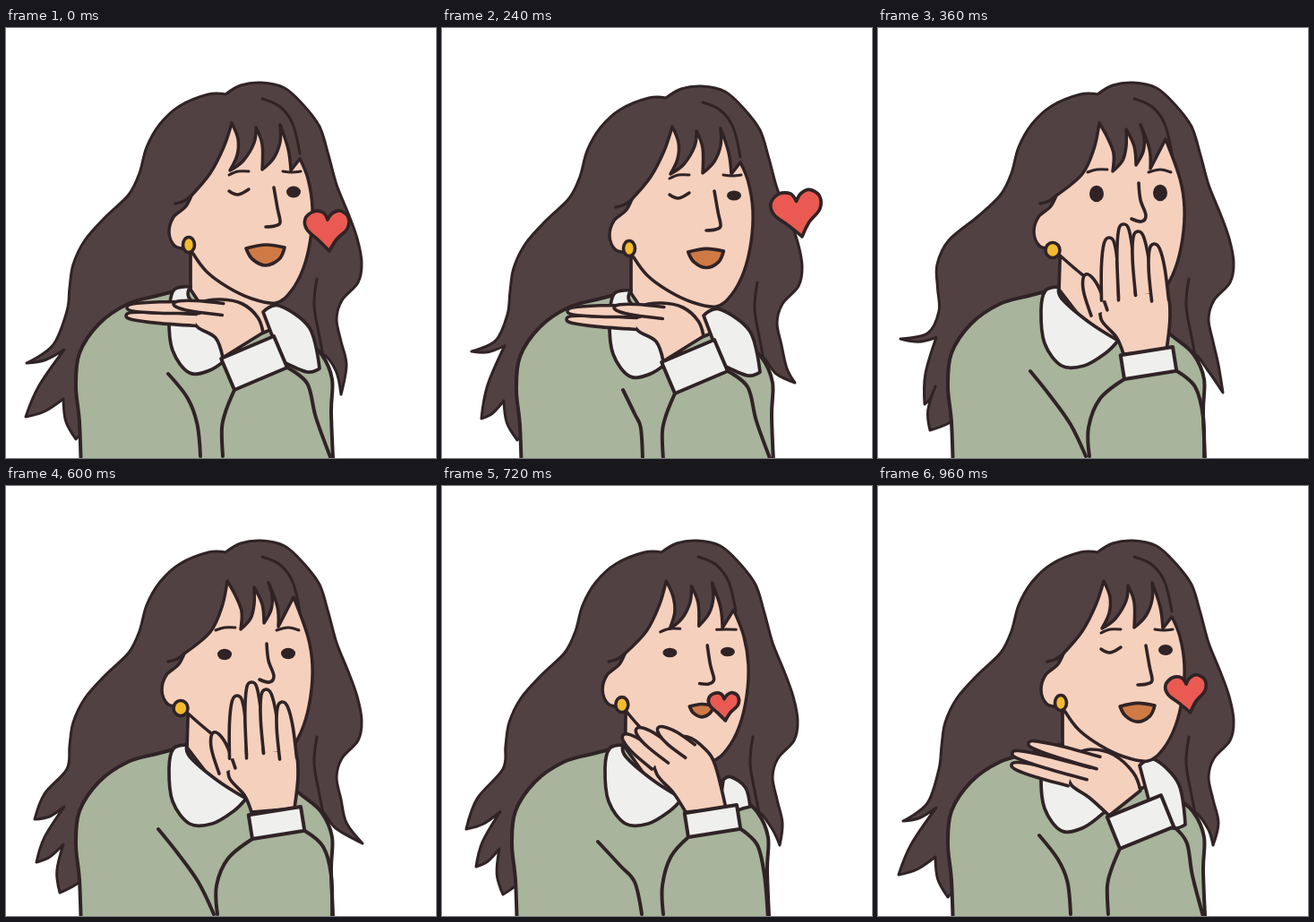
These frames come from a looping animation (480 px wide and 480 px high, 1080 ms). An HTML page:

```html
<!DOCTYPE html>
<html lang="en">
<head>
<meta charset="utf-8">
<title>Blowing a kiss</title>
<style>
html, body { margin: 0; width: 100%; height: 100%; overflow: hidden; background: #fff; }
svg { display: block; width: 100vw; height: 100vh; }
</style>
</head>
<body>
<svg id="stage" viewBox="0 0 480 480" stroke-linejoin="round" stroke-linecap="round"></svg>
<script>
const INK = '#302326', SKIN = '#f5d0bd', GREEN = '#a8b49c', WHITE = '#efefee', HAIR = '#514143';
const STEP = 120, LOOP = 1080;

// Points are written "x,y"; a trailing ! marks a sharp corner
const parse = s => s.trim().split(/\s+/).map(w => {
  const [x, y] = w.replace('!', '').split(',').map(Number);
  return { x, y, sharp: w.endsWith('!') };
});
const move = (p, x, y, sharp = false) => ({ x: p.x + x, y: p.y + y, sharp });

// Blends numbers, points, lists and whole poses
function mix(a, b, t) {
  if (typeof a === 'number') return a + (b - a) * t;
  if (Array.isArray(a)) return a.map((v, i) => mix(v, b[i], t));
  if (a && typeof a === 'object') {
    return Object.fromEntries(Object.keys(a).map(k => [k, mix(a[k], b[k], t)]));
  }
  return a;
}

// Smooth curve through the points, with straight handles at corners
function curve(pts, closed) {
  const n = pts.length, at = i => pts[(i + n) % n];
  const handle = i => {
    const end = !closed && (i === 0 || i === n - 1);
    if (at(i).sharp || end) return [0, 0];
    return [(at(i + 1).x - at(i - 1).x) / 6, (at(i + 1).y - at(i - 1).y) / 6];
  };
  let d = `M${pts[0].x} ${pts[0].y}`;
  for (let i = 0; i < (closed ? n : n - 1); i++) {
    const p = at(i), q = at(i + 1), h = handle(i), g = handle((i + 1) % n);
    d += `C${p.x + h[0]} ${p.y + h[1]} ${q.x - g[0]} ${q.y - g[1]} ${q.x} ${q.y}`;
  }
  return d + (closed ? 'Z' : '');
}

const path = (d, fill, width) =>
  `<path d="${d}" fill="${fill}" stroke="${width ? INK : 'none'}" stroke-width="${width}"/>`;
const points = p => typeof p === 'string' ? parse(p) : p;
const shape = (p, fill, width = 3.7) => path(curve(points(p), true), fill, width);
const line = (p, width = 3.6) => path(curve(points(p), false), 'none', width);
const oval = (x, y, rx, ry, fill, width = 0) =>
  `<ellipse cx="${x}" cy="${y}" rx="${rx}" ry="${ry}" fill="${fill}" stroke="${INK}" stroke-width="${width}"/>`;

// Each gesture: palm outline and fingers as [base x, base y, tip x, tip y]
const offer = {
  palm: parse('287,340! 281,323 264,308 240,303 216,307 206,319 214,334 234,346 242,368!'),
  fingers: [[212, 326, 134, 321], [216, 312, 135, 312], [242, 314, 187, 308]], thick: 6.5
};
const cup = {
  palm: parse('322,360! 326,322 322,298 300,295 270,297 252,304 249,325 266,345 274,364!'),
  fingers: [[247, 318, 232, 275], [259, 304, 258, 234], [278, 299, 274, 219],
    [297, 297, 290, 227], [315, 304, 308, 241]], thick: 9.5
};
const curl = {
  palm: parse('317,360! 305,312 294,294 274,280 256,285 237,300 240,322 258,342 272,364!'),
  fingers: [[240, 309, 202, 278], [258, 302, 217, 271], [277, 296, 241, 270]], thick: 9
};
const fan = {
  palm: parse('293,340! 285,320 263,300 238,294 222,300 212,318 216,334 236,348 258,368!'),
  fingers: [[214, 328, 149, 311], [235, 321, 150, 298], [246, 309, 168, 287]], thick: 7
};

// turn: 0 faces forward, 1 looks aside. tips: ends of the loose locks.
// heart: x, y, size, angle. cuff: x, y, angle, width, height. arm, fold: where the creases run.
const send = {
  turn: 1, shift: [0, 0], nod: -2, open: 6.5, wink: 1, smile: 1, puff: 0, flick: 9,
  tips: parse('23,374 22,434 78,459 374,409'), heart: [359, 226, 1, 0],
  cuff: [277, 374, -23, 64, 38], arm: [242, 346], fold: [181, 386, 217],
  collar: parse('287,317! 350,380!'), drop: 8, hand: offer
};
const follow = {
  ...send, shift: [5, 4], open: 5.5, smile: .92, fold: [197, 400, 219],
  tips: parse('28,357 39,432 79,456 389,392'), heart: [392, 203, 1.14, -6]
};
const cover = {
  turn: 0, shift: [0, 0], nod: -1, open: 9.2, wink: 0, smile: 0, puff: -9, flick: 11,
  tips: parse('25,347 52,420 58,449 385,407'), heart: [315, 246, 0, 0],
  cuff: [302, 374, -9, 59, 27], arm: [236, 363], fold: [170, 383, 232],
  collar: null, drop: 0, hand: cup
};
const drowsy = {
  ...cover, nod: 2, open: 6.2, puff: 0, flick: -5, cuff: [302, 376, -9, 59, 27],
  tips: parse('32,372 34,420 60,454 398,399')
};
const kiss = {
  ...cover, turn: .65, nod: 0, open: 5.3, smile: .62, puff: 0, flick: -6,
  tips: parse('27,383 38,425 68,456 377,401'), heart: [315, 246, .69, 0],
  arm: [247, 360], fold: [174, 397, 223], collar: parse('314,328! 344,358!'), hand: curl
};
const release = {
  ...send, open: 6, smile: .9, tips: parse('28,374 23,434 78,459 374,401'),
  heart: [345, 232, .92, -5], cuff: [293, 375, -22, 65, 38], arm: [257, 351],
  fold: [180, 390, 215], collar: parse('292,312! 343,378!'), hand: fan
};
const poses = [
  send, mix(send, follow, .5), follow,
  cover, mix(cover, drowsy, .5), drowsy,
  kiss, mix(kiss, release, .5), release
];

function hair({ tips, flick, puff }) {
  const edge = parse(`245,74! 226,74 194,87 172,107 157,133 149,162 137,186 112,210
    ${88 + puff},237 ${75 + puff},264 ${71 + puff / 2},290 68,316`);
  const roots = [{ x: 65, y: tips[0].y / 2 + 172 }, { x: 64, y: tips[1].y - 20 }, { x: 100, y: 425 }];
  let from = edge[edge.length - 1];
  roots.forEach((root, i) => {
    const tip = tips[i], bend = i ? [-5, 0] : [flick, flick * .7];
    edge.push(move(mix(from, tip, .55), ...bend), move(tip, 0, 0, true),
      move(mix(tip, root, .5), 0, 4), move(root, 0, 0, true));
    from = root;
  });
  edge.push(...parse(`340,390! 352,364 368,382 ${tips[3].x},${tips[3].y}! 380,376 374,350 369,325 375,304
    393,284 397,262 392,235 382,207 369,175 360,142 350,110 332,86 311,67 285,61 262,64`));
  return shape(edge, HAIR, 3) + line('286,79 306,88 320,107 328,140', 3) + line('347,280 344,310 350,345 355,370', 3);
}

function clothes({ turn, collar, drop }) {
  const ear = 8 * (turn - 1);
  let out = shape(`84,500! 82,440 78,400 82,363 104,330 136,308 168,299 204,290! 300,320!
    330,345 352,364 364,392 363,430 366,500!`, GREEN, 4);
  out += shape(`${206 + ear / 3},250! ${206 + ear / 2},292! 235,335! 268,348! 300,335! 302,290!`, SKIN);
  if (collar) {
    const [top, tail] = collar, k = Math.hypot(tail.x - top.x, tail.y - top.y) / 89;
    out += shape([top, move(top, 18 * k, -7 * k), move(mix(top, tail, .6), 14 * k, -20 * k),
      tail, move(tail, -14, 4), { x: 308, y: 372, sharp: true }], WHITE);
  }
  return out + shape(`${202 + drop / 2},289! 187,293 182,${315 + drop} 186,${352 + drop} 205,${377 + drop}
    230,${377 + drop / 2} 254,363 268,349! 235,328 205,302`, WHITE);
}

function head({ turn, nod, open, wink, smile }) {
  const ear = 8 * (turn - 1);
  const aside = (a, b) => mix(parse(a), parse(b), turn);
  const feature = (a, b) => aside(a, b).map(p => move(p, 0, nod));
  const lobe = parse('209,252! 200,247 188,243 182,228 187,211 200,200 207,187!').map(p => move(p, ear, 0, p.sharp));
  const fringe = aside(
    '228,163 241,135 247,106! 256,122 263,140 262,160! 273,148 277,132 277,113! 286,132 288,153! 296,138 297,122 293,108! 303,135 304,157! 321,124!',
    '228,162 243,133 252,106! 259,124 258,142 250,159! 265,148 277,128 279,111! 286,130 286,158! 299,145 306,127 306,108! 315,135 318,159! 328,146!');
  const cheek = parse('337,168 342,200 340,235 332,268 318,294 301,307 274,302 247,289 224,272');
  const eye = mix(244, 260, turn), y = 186 + nod;

  let out = shape([...lobe, ...fringe, ...cheek], SKIN, 3.5);
  out += line([move(lobe[6], -18, 9), move(lobe[6], -8, 6), lobe[6]], 3.5);
  out += line(aside('234,161 244,158 256,158', '249,164 259,160 271,160'), 3);
  out += line(aside('302,161 315,158 327,161', '309,160 319,161 329,160'), 3);
  out += line(feature('291,174 293,193 299,210 294,217 283,214', '299,180 303,203 306,219 300,223 290,224'));
  out += wink >= .5
    ? line(`${eye - 11},${y - 2} ${eye - 1},${y + 2} ${eye + 11},${y - 4}`, 3.4)
    : oval(eye, y, 8, open, INK);
  out += oval(mix(315, 321, turn), y - 1, 8, open, INK);
  const lip = (x, dy) => `${290 + x * smile},${246 + dy * smile}`;
  if (smile) {
    out += shape(`${lip(-22, 0)}! ${lip(0, -4)} ${lip(21, -1)}! ${lip(15, 12)} ${lip(0, 19)} ${lip(-15, 12)}`, '#cf7a45');
  }
  return out + oval(mix(195, 204, turn), mix(248, 242, turn), mix(8, 6.5, turn), 8.5, '#f2bb30', 3.6);
}

function finger([bx, by, tx, ty], thick) {
  const len = Math.hypot(tx - bx, ty - by), ux = (tx - bx) / len, uy = (ty - by) / len;
  const at = (along, side) => ({ x: bx + ux * along - uy * side, y: by + uy * along + ux * side });
  const pts = [at(0, thick), at(len * .55, thick * .95), at(len - 6, thick * .6), at(len, 0),
    at(len - 6, -thick * .6), at(len * .55, -thick * .95), at(0, -thick)];
  return path(curve(pts, false), SKIN, 3.6);
}

function arm({ turn, cuff: [x, y, angle, w, h], arm: [left, right], fold: [fx, fy, end], hand }) {
  const a = angle * Math.PI / 180, c = Math.cos(a), s = Math.sin(a);
  const corner = (i, j) => ({ x: x + c * i * w / 2 - s * j * h / 2, y: y + s * i * w / 2 + c * j * h / 2, sharp: true });
  const p = corner(-1, 1), q = corner(1, 1);
  let out = line(`${fx},${fy} ${mix(fx, end, mix(.35, .6, turn))},${fy + 27} ${mix(fx, end, mix(.72, .9, turn))},442 ${end},478`, 4);
  out += line(`${p.x},${p.y} ${mix(p.x, left, .7)},${p.y + 22} ${left - 1},446 ${left},478`, 4);
  out += line(`${q.x},${q.y} ${mix(q.x, right, .7)},${q.y + 18} ${right},435 364,484`, 4);
  out += shape(hand.palm, SKIN);
  out += hand.fingers.map(f => finger(f, hand.thick)).join('');
  return out + shape([corner(-1, -1), corner(1, -1), q, p], WHITE, 4);
}

function heart([x, y, size, angle]) {
  if (!size) return '';
  const a = angle * Math.PI / 180, c = Math.cos(a) * size, s = Math.sin(a) * size;
  const pts = parse('0,-12! -5,-20 -16,-21 -25,-13 -23,-1 -10,11 2,23! 10,10 22,-2 23,-15 14,-22 5,-19');
  return shape(pts.map(p => ({ x: x + p.x * c - p.y * s, y: y + p.x * s + p.y * c, sharp: p.sharp })), '#ea5a52');
}

const stage = document.getElementById('stage');
let shown = -1;
function draw(ms) {
  const i = Math.floor((ms % LOOP) / STEP);
  if (i === shown) return;
  shown = i;
  const p = poses[i];
  stage.innerHTML = `<g transform="translate(${p.shift})">` +
    hair(p) + clothes(p) + head(p) + arm(p) + heart(p.heart) + '</g>';
}

const start = performance.now();
function tick() {
  draw(performance.now() - start);
  requestAnimationFrame(tick);
}
tick();
</script>
</body>
</html>
```
